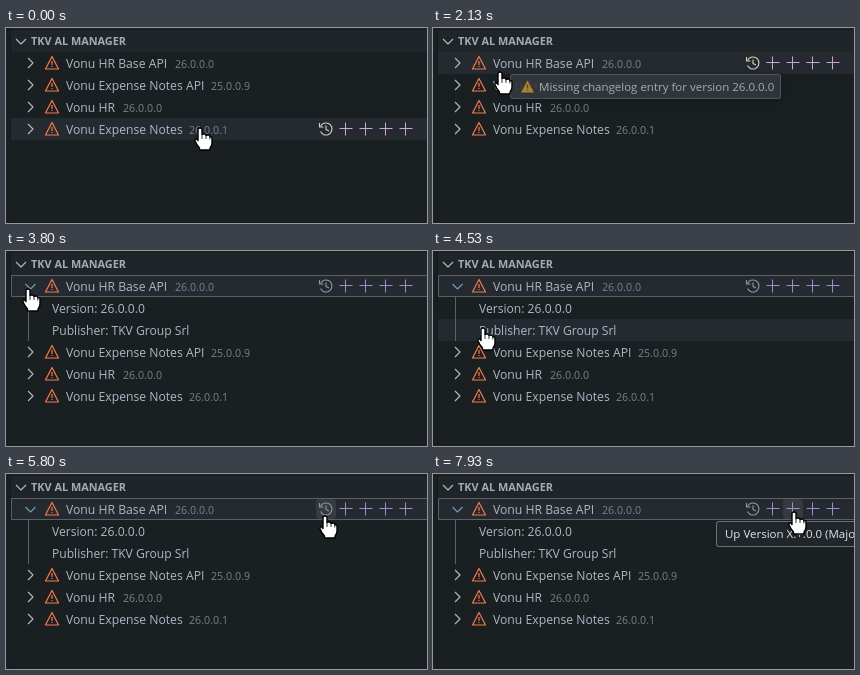
Write an HTML page with a canvas that moves like this. It is 421 px wide and 195 px high and loops after 8000 ms.

```html
<!DOCTYPE html>
<html lang="en">
<head>
<meta charset="utf-8">
<title>Extension tree</title>
<style>
html, body { margin: 0; width: 100%; height: 100%; overflow: hidden; background: #1a2023; }
canvas { display: block; width: 421px; height: 195px; }
</style>
</head>
<body>
<canvas id="stage"></canvas>
<script>
const W = 421, H = 195, LOOP = 8000, FPS = 15, ROW = 22, TOP = 24;
const canvas = document.getElementById('stage');
const ctx = canvas.getContext('2d');
const dpr = window.devicePixelRatio || 1;
canvas.width = W * dpr;
canvas.height = H * dpr;

const FONT = '"Open Sans", "Noto Sans", sans-serif';
const C = {
  bg: '#1a2022', head: '#1f2529', hover: '#252a31', edge: '#161b1d', text: '#acb9c6', dim: '#76828c',
  warn: '#f5794f', chev: '#b4bac0', open: '#6f9db5', plus: '#cba6d8', plusDim: '#9a8fc8',
  clock: '#d8d2ba', clockDim: '#9197a3', focus: '#5b6167', tip: '#20262a', tipEdge: '#6b7177', tipText: '#e2e6ea'
};

const apps = [
  { name: 'Vonu HR Base API', version: '26.0.0.0', vx: 169 },
  { name: 'Vonu Expense Notes API', version: '25.0.0.9', vx: 205 },
  { name: 'Vonu HR', version: '26.0.0.0', vx: 117 },
  { name: 'Vonu Expense Notes', version: '26.0.0.1', vx: 183 }
];
const details = [{ detail: 'Version: 26.0.0.0' }, { detail: 'Publisher: TKV Group Srl' }];

// pointer path: step, x, y
const path = [
  [0, 194, 100], [4, 44, 61], [7, 44, 61], [12, 21, 50], [16, 28, 41], [22, 28, 41],
  [25, 67, 44], [47, 67, 44], [51, 22, 38], [61, 22, 38], [68, 50, 77], [71, 171, 79],
  [74, 71, 79], [79, 232, 79], [87, 319, 42], [101, 319, 42], [102, 322, 41],
  [105, 384, 41], [108, 363, 39], [114, 363, 39], [119, 361, 38]
];

// from / until in steps, fade = steps to full opacity
const tips = [
  { from: 31, until: 53, fade: 3, x: 77, y: 46, w: 271, h: 25, tx: 106, icon: true, shadow: true,
    text: 'Missing changelog entry for version 26.0.0.0' },
  { from: 75, until: 82, fade: 3, x: 112, y: 90, w: 148, h: 25, tx: 121, shadow: true,
    text: 'Publisher: TKV Group Srl' },
  { from: 93, until: 104, fade: 2, x: 256, y: 47, w: 130, h: 26, tx: 264, text: 'Add Changelog Entry' },
  { from: 115, until: 120, fade: 3, x: 283, y: 47, w: 160, h: 26, tx: 292, text: 'Up Version X.+.0.0 (Major)' }
];

const hand = new Path2D('M-2 1.5Q-2 0 0 0Q2 0 2 1.5V6.5Q3 5.8 4.5 6Q6 6.2 6 7.5Q7.5 6.8 8.8 7.2' +
  'Q10 7.6 9.8 8.8Q12 8.4 12 10.5V15Q12 18 10 20V22H-.5V20Q-4 16 -5 12.8Q-5.2 10.5 -3.6 10.8L-2 12.5Z');
const knuckles = new Path2D('M2 6.5V11M6 7.5V11M9.8 8.8V11.5');

function text(str, x, y, size, color, weight = 400) {
  ctx.font = `${weight} ${size}px ${FONT}`;
  ctx.fillStyle = color;
  ctx.fillText(str, x, y);
}

function line(points, color, width = 1) {
  ctx.beginPath();
  points.forEach(([x, y]) => ctx.lineTo(x, y));
  ctx.strokeStyle = color;
  ctx.lineWidth = width;
  ctx.stroke();
}

function box(x, y, w, h, r, color) {
  ctx.beginPath();
  ctx.roundRect(x, y, w, h, r);
  ctx.fillStyle = color;
  ctx.fill();
}

function chevron(x, y, open, color) {
  line(open ? [[x - 5, y - 2], [x, y + 3], [x + 5, y - 2]]
            : [[x - 2.5, y - 5], [x + 2.5, y], [x - 2.5, y + 5]], color, 1.1);
}

function warning(x, y) {
  ctx.lineJoin = 'round';
  line([[x, y - 6.5], [x + 6.5, y + 6], [x - 6.5, y + 6], [x, y - 6.5], [x + 6.5, y + 6]], C.warn, 1.2);
  ctx.fillStyle = C.warn;
  ctx.fillRect(x - 0.6, y - 2, 1.2, 4);
  ctx.fillRect(x - 0.6, y + 3, 1.2, 1);
}

function clock(x, y, color) {
  ctx.beginPath();
  ctx.arc(x, y, 6, -2.7, 2.7);
  ctx.strokeStyle = color;
  ctx.lineWidth = 1.1;
  ctx.stroke();
  line([[x - 6.5, y - 6], [x - 6.5, y - 2], [x - 2.5, y - 2]], color, 1.1);
  line([[x, y - 3.5], [x, y + 0.5], [x + 3, y + 2]], color, 1.1);
}

function actions(y, focused, p) {
  [320, 340, 360, 380, 400].forEach((x, i) => {
    if (Math.abs(p.x - x) < 10 && Math.abs(p.y - y) < 11) box(x - 10, y - 10, 20, 20, 4, 'rgba(255,255,255,.08)');
    if (i === 0) return clock(x, y, focused ? C.clockDim : C.clock);
    const color = focused ? C.plusDim : C.plus;
    line([[x - 6.5, y - 0.5], [x + 6.5, y - 0.5]], color);
    line([[x - 0.5, y - 6.5], [x - 0.5, y + 6.5]], color);
  });
}

function pointerAt(step) {
  const i = Math.max(1, path.findIndex(k => k[0] >= step));
  const [s0, x0, y0] = path[i - 1], [s1, x1, y1] = path[i];
  const u = (step - s0) / (s1 - s0), e = u * u * (3 - 2 * u);
  return { x: x0 + (x1 - x0) * e, y: y0 + (y1 - y0) * e };
}

function tree(step, p) {
  const focused = step >= 56, open = step >= 57;
  const rows = open ? [apps[0], ...details, ...apps.slice(1)] : apps;
  const over = Math.floor((p.y - TOP) / ROW);
  rows.forEach((row, i) => {
    const y = TOP + i * ROW, mid = y + 11, active = focused && i === 0;
    if (i === over || active) {
      ctx.fillStyle = C.hover;
      ctx.fillRect(5, y, W - 5, ROW);
    }
    if (row.detail) {
      line([[22.5, y], [22.5, y + ROW]], C.focus);
      return text(row.detail, 46, mid + 4.5, 12.1, C.text);
    }
    if (active) {
      ctx.strokeStyle = C.focus;
      ctx.lineWidth = 1;
      ctx.strokeRect(5.5, y + 0.5, W - 5, ROW - 1);
    }
    const expanded = open && i === 0;
    chevron(24.5, mid, expanded, expanded ? C.open : C.chev);
    warning(46, mid);
    text(row.name, 60, mid + 4.5, 12.2, C.text);
    text(row.version, row.vx, mid + 4.5, 10.7, C.dim);
    if (i === over || active) actions(mid, active, p);
  });
}

function tooltip(t, step) {
  if (step < t.from || step >= t.until) return;
  ctx.save();
  ctx.globalAlpha = Math.min(1, (step - t.from + 1) / t.fade);
  if (t.shadow) {
    ctx.shadowColor = 'rgba(0,0,0,.4)';
    ctx.shadowBlur = 8 * dpr;
    ctx.shadowOffsetY = 2 * dpr;
  }
  box(t.x, t.y, t.w, t.h, 3, C.tipEdge);
  ctx.shadowColor = 'transparent';
  box(t.x + 1, t.y + 1, t.w - 2, t.h - 2, 2, C.tip);
  const mid = t.y + t.h / 2;
  if (t.icon) {
    ctx.beginPath();
    ctx.moveTo(94.5, mid - 6);
    ctx.lineTo(101, mid + 6);
    ctx.lineTo(88, mid + 6);
    ctx.fillStyle = '#f5a52d';
    ctx.fill();
    ctx.fillStyle = '#33291c';
    ctx.fillRect(93.9, mid - 2, 1.3, 4);
    ctx.fillRect(93.9, mid + 3, 1.3, 1.3);
  }
  text(t.text, t.tx, mid + 4, 11.5, C.tipText);
  ctx.restore();
}

function pointer(p) {
  ctx.save();
  ctx.translate(Math.round(p.x), Math.round(p.y));
  ctx.lineJoin = 'round';
  ctx.lineWidth = 1.4;
  ctx.strokeStyle = '#000';
  ctx.fillStyle = '#fff';
  ctx.fill(hand);
  ctx.stroke(hand);
  ctx.lineWidth = 0.8;
  ctx.stroke(knuckles);
  ctx.restore();
}

function draw(ms) {
  const step = Math.min(119, Math.floor((ms % LOOP) * FPS / 1000 + 0.06));
  const p = pointerAt(step);
  ctx.setTransform(dpr, 0, 0, dpr, 0, 0);
  ctx.fillStyle = C.bg;
  ctx.fillRect(0, 0, W, H);
  ctx.fillStyle = C.head;
  ctx.fillRect(5, 2, W - 5, 22);
  ctx.fillStyle = C.edge;
  ctx.fillRect(4, 0, 1, H);
  chevron(15, 13, true, C.chev);
  text('TKV AL MANAGER', 25, 17, 10.9, '#a3adb7', 700);
  tree(step, p);
  tips.forEach(t => tooltip(t, step));
  pointer(p);
}

const start = performance.now();
function tick() {
  draw(performance.now() - start);
  requestAnimationFrame(tick);
}
tick();
</script>
</body>
</html>
```
